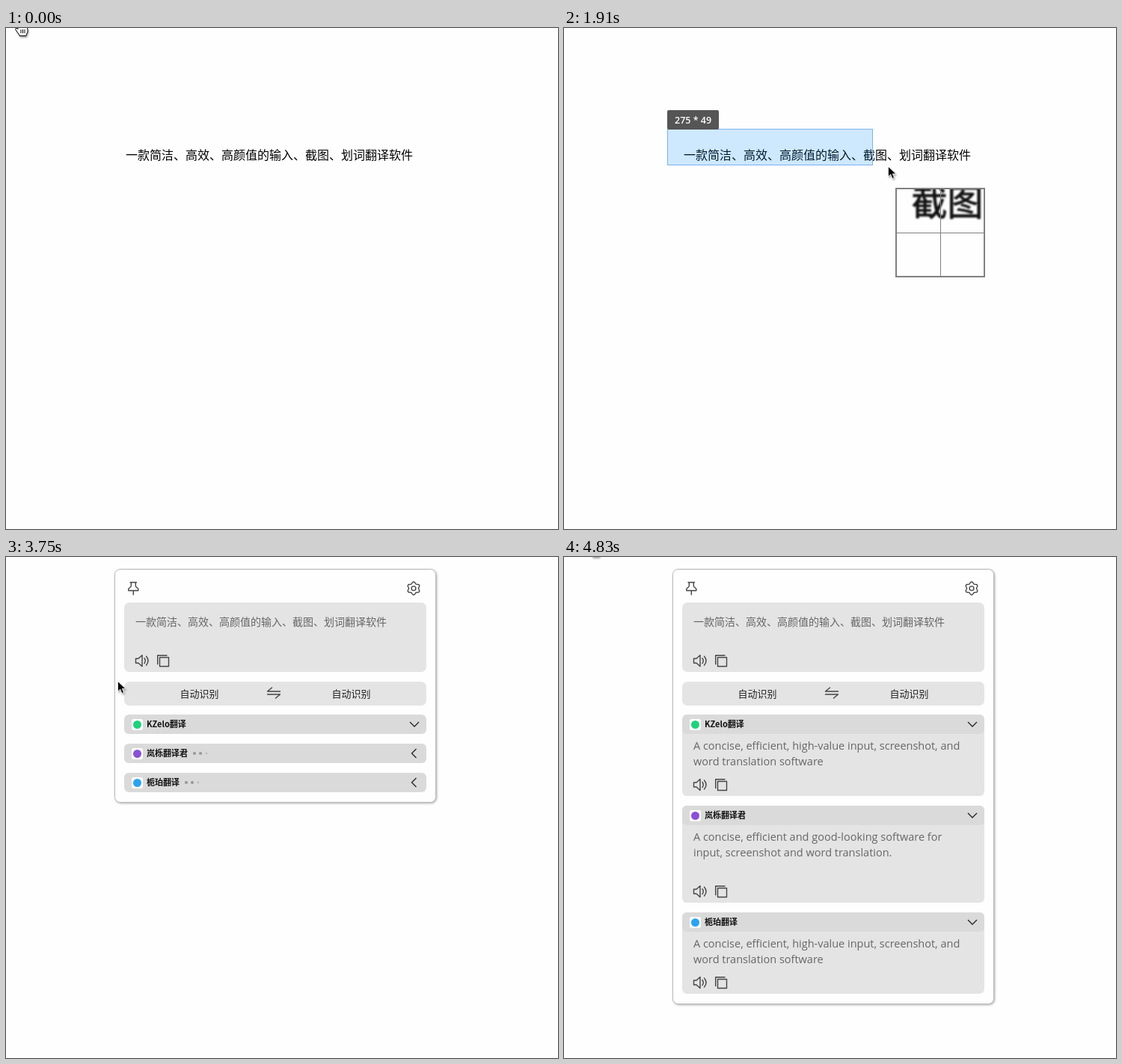
An HTML page for the animation above (5120 ms loop, 738x671 px).

```html
<!DOCTYPE html>
<html lang="zh-CN">
<head>
<meta charset="utf-8">
<style>
html, body { margin: 0; width: 100%; height: 100%; overflow: hidden; background: #fefefe; }
#stage { display: block; }
text { font-family: "Open Sans", "Noto Sans CJK SC", "Noto Sans CJK", sans-serif; }
.cjk { font-family: "Noto Sans CJK SC", "Noto Sans CJK", sans-serif; }
.page { font-size: 16px; }
.input { font-size: 14px; fill: #666; }
.result { font-size: 14.5px; fill: #666; }
.lang { font-size: 13px; fill: #222; }
.wait { font-size: 12px; fill: #888; }
.name { font-size: 11px; font-weight: 700; fill: #111; }
.size { font-size: 12.5px; font-weight: 600; fill: #fff; }
.icon { fill: none; stroke: #444; stroke-width: 1.4; stroke-linejoin: round; stroke-linecap: round; }
.chev { fill: none; stroke: #222; stroke-width: 1.3; }
.box { fill: #e4e4e4; }
#frame { fill: #fefefe; stroke: #bbb; filter: drop-shadow(1px 1px 1.5px #0005); }
#zoom { fill: #111; stroke: #111; stroke-width: .3; filter: blur(1px); }
#cursor { filter: drop-shadow(1px 2px 1px #0005); }
</style>
</head>
<body>
<svg id="stage" width="738" height="671">
  <defs>
    <text id="line" class="cjk page" x="160" y="176">一款简洁、高效、高颜值的输入、截图、划词翻译软件</text>
    <g id="tools" class="icon">
      <path d="M173.5 136h3.5l5-4.5v15l-5-4.5h-3.5zM185 135.5q2.5 3.5 0 7M187.5 133q5 6 0 12"/>
      <path d="M205.5 134.5h12v12h-12zM202.7 143.5V131.7H215"/>
    </g>
    <clipPath id="clip"><rect id="clipBox" x="158" y="211" width="404" rx="6"/></clipPath>
  </defs>

  <use href="#line"/>

  <g id="select">
    <rect id="area" x="138.5" y="135.5" fill="#08f" fill-opacity=".19" stroke="#7ab2ee"/>
    <rect id="tag" x="138" y="110" height="26" rx="2" fill="#555"/>
    <text id="size" class="size" x="148" y="128"></text>
  </g>

  <svg id="lens" width="120" height="120">
    <rect width="120" height="120" fill="#fefefe"/>
    <g id="zoom"><use id="zoomed" href="#line"/></g>
    <rect x="1" y="1" width="118" height="118" fill="none" stroke="#808080" stroke-width="2"/>
    <path d="M60.5 0v120M0 60.5h120" stroke="#808080"/>
  </svg>

  <g id="panel">
    <rect id="frame" x="145.5" y="16.5" width="429" rx="7"/>
    <path class="icon" d="M166 34h8.5M167.3 34v4.5q0 1.5-3.5 4V45h13v-2.5q-3.5-2.5-3.5-4V34M170.3 45v5.5"/>
    <g class="icon"><path id="gear"/><circle cx="545" cy="42" r="2.9"/></g>
    <rect class="box" x="158" y="61" width="404" height="93" rx="7"/>
    <g id="waiting">
      <text class="cjk wait" x="168" y="83.5">文字识别中</text>
      <g class="dots" transform="translate(241 79)"></g>
      <path class="icon" d="M173 138.5l7.5-6.5v4q9 .5 10 10q-4-5-10-4.5v4z"/>
    </g>
    <g id="found">
      <text class="cjk input" x="173" y="92.3">一款简洁、高效、高颜值的输入、截图、划词翻译软件</text>
      <use href="#tools"/>
    </g>
    <rect class="box" x="158" y="167" width="404" height="32" rx="7"/>
    <text class="cjk lang" x="232.5" y="188">自动识别</text>
    <text class="cjk lang" x="435.5" y="188">自动识别</text>
    <path class="icon" d="M366.5 180h-17l6-5M349.5 184h17l-6 5"/>
    <g id="cards" clip-path="url(#clip)"></g>
  </g>

  <g id="cursor">
    <path id="arrow" d="M.5 .5V14l3.2-3L6 16.5l2.5-1-2.3-5.2h4.6z" stroke="#fff" stroke-width=".8"/>
    <g id="hand" fill="#fff" stroke="#000">
      <path d="M6 .5q2 0 2 2v6l7 1.5q2 .5 2 3v3l-2 4.500v1H6v-1l-5-7q-1-2 1-2.500l2 1.500v-9q0-2 2-2z"/>
      <path d="M8 13v5M10.500 13v5M13 13v5" fill="none"/>
    </g>
    <path id="beam" d="M0 .5h2.500l1 1 1-1H7M3.500 1v14M0 15.500h2.500l1-1 1 1H7" fill="none" stroke="#000"/>
  </g>
</svg>
<script>
const LOOP = 5120, FPS = 11, LAG = 36;
const CAPTURE = 670, DRAG = 1480, RELEASE = 2660, PANEL = 2770, FOUND = 3630;
const OPEN = 3840, BEAT = 200; // cards unfold one per beat

const $ = id => document.getElementById(id);
const set = (el, attrs) => { for (const k in attrs) el.setAttribute(k, attrs[k]); };
const show = (el, on) => { el.style.display = on ? '' : 'none'; };

// pointer path: time, x, y
const path = [
  [0, 12, -11], [560, 153, 158], [1110, 139, 135], [1398, 139, 135], [1570, 334, 163],
  [1909, 413, 184], [2110, 527, 192], [2390, 562, 208], [2770, 562, 208], [3070, 498, 206],
  [3330, 212, 172], [3750, 145, 166], [4300, 136, 193], [4650, 59, 11], [4810, 32, -22]];

const short = ['A concise, efficient, high-value input, screenshot, and', 'word translation software'];
const long = ['A concise, efficient and good-looking software for', 'input, screenshot and word translation.'];
const cards = [
  { name: 'KZelo翻译', color: '#20d27c', lines: short, full: 109 },
  { name: '岚栎翻译君', color: '#8b50d6', lines: long, full: 130 },
  { name: '栀珀翻译', color: '#2aa4f0', lines: short, full: 109 }];

cards.forEach((c, i) => {
  c.open = OPEN + BEAT * i;
  c.el = document.createElementNS('http://www.w3.org/2000/svg', 'g');
  c.el.innerHTML = `
    <g class="body">
      <rect class="box" x="158" width="404" height="${c.full}" rx="6"/>
      ${c.lines.map((s, n) => `<text class="result" x="173" y="${47 + 21 * n}">${s}</text>`).join('')}
      <use href="#tools" y="${c.full - 154}"/>
    </g>
    <rect x="158" width="404" height="26" rx="6" fill="#dadada"/>
    <rect x="168" y="6" width="15" height="15" rx="3" fill="#fff"/>
    <circle cx="175.5" cy="13.5" r="5.5" fill="${c.color}"/>
    <text class="cjk name" x="188" y="17">${c.name}</text>
    <g class="dots" transform="translate(${197 + 11 * c.name.replace(/\w\w/g, '_').length} 13)"></g>
    <path class="chev"/>`;
  $('cards').append(c.el);
});
const allDots = document.querySelectorAll('.dots');
for (const g of allDots)
  g.innerHTML = [0, 8, 16].map(x => `<circle cx="${x}" fill="#999"/>`).join('');

const rim = Array.from({ length: 72 }, (_, i) => {
  const a = i * Math.PI / 36, r = 7.6 + 1.1 * Math.cos(6 * a);
  return `${(545 + r * Math.sin(a)).toFixed(2)} ${(42 - r * Math.cos(a)).toFixed(2)}`;
});
set($('gear'), { d: `M${rim.join('L')}z` });

function pointAt(t) {
  const i = path.findIndex(p => p[0] > t);
  if (i < 0) return path.at(-1).slice(1);
  const [a, b] = [path[i - 1], path[i]], k = (t - a[0]) / (b[0] - a[0]);
  return [1, 2].map(n => Math.round(a[n] + (b[n] - a[n]) * k));
}

function drawCapture(t, [x, y]) {
  const on = t >= CAPTURE && t < RELEASE, drag = on && t >= DRAG;
  show($('lens'), on);
  show($('select'), drag);
  set($('lens'), { x: x + 30, y: y + 30 });
  set($('zoomed'), { transform: `translate(${60.5 - 3 * x} ${60.5 - 3 * y}) scale(3)` });
  if (!drag) return;
  const w = x - 138, h = y - 135;
  set($('area'), { width: w - 1, height: h - 1 });
  $('size').textContent = `${w} * ${h}`;
  set($('tag'), { width: Math.round($('size').getComputedTextLength()) + 20 });
}

function drawPanel(t) {
  show($('panel'), t >= PANEL);
  show($('waiting'), t < FOUND);
  show($('found'), t >= FOUND);
  // the window grows by a fixed amount per beat until everything fits
  const bottom = t < OPEN ? 329 : Math.min(599, 414 + 68 * Math.floor((t - OPEN) / BEAT));
  set($('frame'), { height: bottom - 17 });
  set($('clipBox'), { height: bottom - 225 });
  let y = 211;
  for (const c of cards) {
    const open = t >= c.open, ready = t >= c.open - 90;
    set(c.el, { transform: `translate(0 ${y})` });
    show(c.el.querySelector('.body'), open);
    show(c.el.querySelector('.dots'), t >= FOUND && !ready);
    set(c.el.querySelector('.chev'), { d: ready ? 'M540 10l6 6 6-6' : 'M548.5 7l-6 6 6 6' });
    y += (open ? c.full : 26) + 13;
  }
}

function drawDots(t) {
  for (const g of allDots)
    [...g.children].forEach((dot, i) => {
      const phase = (t - 2727) / 667 - (i - 2) / 3;
      set(dot, { r: 1.7 + .8 * Math.cos(2 * Math.PI * phase) });
    });
}

function drawCursor(t, tick) {
  const lag = t >= CAPTURE && t < RELEASE ? LAG : 0; // the overlay trails the pointer
  const hand = t < 90 || t >= 4740, beam = !hand && t >= 4650;
  show($('hand'), hand);
  show($('beam'), beam);
  show($('arrow'), !hand && !beam);
  set($('cursor'), { transform: `translate(${pointAt(tick + lag)})` });
}

function draw(now) {
  const t = now % LOOP, tick = Math.floor(t * FPS / 1000) * 1000 / FPS;
  drawCapture(t, pointAt(tick));
  drawPanel(t);
  drawDots(tick);
  drawCursor(t, tick);
}

const start = performance.now();
function loop() {
  draw(performance.now() - start);
  requestAnimationFrame(loop);
}
loop();
</script>
</body>
</html>
```
